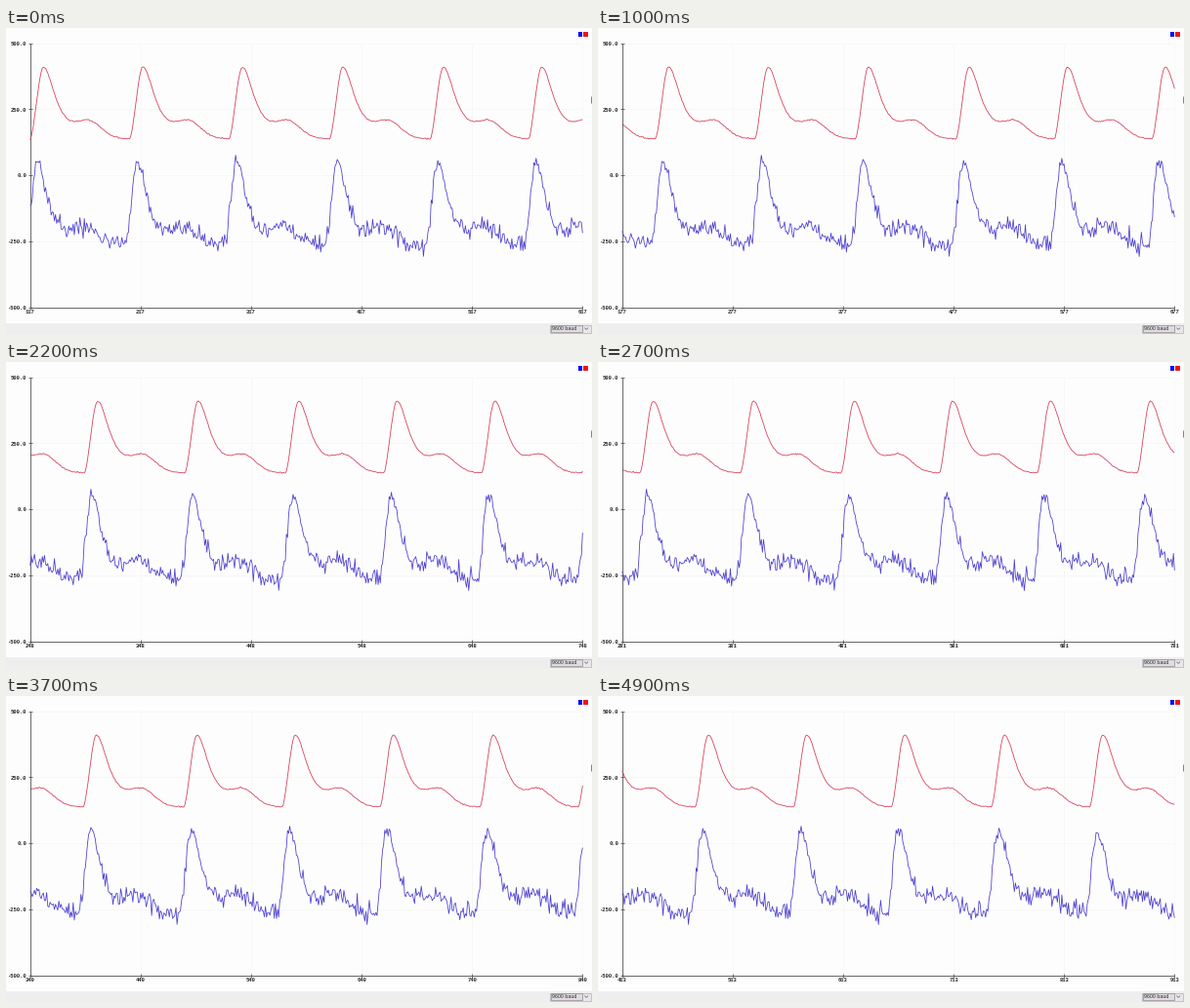
Recreate the animation shown at these times as a matplotlib script. Size 600x314 px, loop 5000 ms.

```python
import numpy as np
import matplotlib.pyplot as plt
from matplotlib.animation import FuncAnimation
from matplotlib.patches import Rectangle

W, H, DPI = 600, 314, 100
FRAMES, INTERVAL = 50, 100
LEFT, RIGHT, TOP, BOTTOM = 24.7, 590.3, 15.5, 286.5
SPAN = 500                       # samples across the plot
STEP = (RIGHT - LEFT) / SPAN     # pixels per sample
FIRST, LAST = 117, 913
PX = 72 / DPI                    # points per pixel

# Scroll: first visible sample at a few frames
SCROLL = ([0, 10, 22, 27, 37, 44, 49], [117, 177, 248, 281, 340, 382, 413])
BEATS = np.array([129, 219, 309, 400, 491, 580, 668.5, 759, 848, 940])


def smoothstep(u):
    u = np.clip(u, 0, 1)
    return u * u * (3 - 2 * u)


def pulse(d, height, decay, hump, rise):
    """Steep rise, long decay and a second small hump; d is pixels from the peak."""
    fall = height / (1 + (d / decay) ** 2) + hump * np.exp(-((d - 47.5) / 12) ** 2 / 2)
    return np.where(d < 0, height * smoothstep(1 + d / rise), fall)


def pulse_train(x, lag=0, **shape):
    return np.max([pulse((x - beat) * STEP + lag, **shape) for beat in BEATS], axis=0)


rng = np.random.default_rng(8)
samples = np.arange(FIRST, LAST + 1)
smooth = 116 - pulse_train(samples, height=76, decay=15, hump=14.5, rise=14.5)
smooth += rng.normal(0, .3, samples.size)

raw_height = pulse_train(samples, lag=6, height=88, decay=12, hump=17, rise=12.5)
raw = 225 - raw_height + rng.normal(0, 1, samples.size) * (5.5 - raw_height / 35)

fig = plt.figure(figsize=(W / DPI, H / DPI), dpi=DPI, facecolor="#fdfdfe")
ax = fig.add_axes([0, 0, 1, 1])
ax.set(xlim=(0, W), ylim=(H, 0))
ax.axis("off")


def line(xs, ys, color, width=1, **kw):
    return ax.plot(xs, ys, color=color, lw=width * PX, solid_capstyle="butt", **kw)[0]


def box(x, y, w, h, fill, edge="none"):
    ax.add_patch(Rectangle((x, y), w, h, fc=fill, ec=edge, lw=.7 * PX, zorder=3))


def label(x, y, text, ha="center", size=5.5, font="Liberation Mono", **kw):
    return ax.text(x, y, text, ha=ha, va="center_baseline", fontsize=size * PX,
                   family=font, color="#2a2a2a", zorder=4, **kw)


tick_x = np.linspace(LEFT, RIGHT, 6)
tick_y = np.linspace(TOP, BOTTOM, 5)
for x in tick_x[1:]:
    line([x, x], [TOP, BOTTOM], "#f7f7f8", zorder=0)
for y, value in zip(tick_y, np.linspace(500, -500, 5)):
    line([LEFT, RIGHT], [y, y], "#f7f7f8", zorder=0)
    line([22.5, 27], [y, y], "#555555", .8)
    label(21, y + .3, f"{value:.1f}", "right", weight="bold")
for x in tick_x:
    line([x, x], [284.5, 288.5], "#555555", .8)
line([LEFT, LEFT], [TOP, BOTTOM], "#444444", .8)
line([LEFT, RIGHT], [BOTTOM, BOTTOM], "#444444", .8)

box(585.5, 4.3, 4.6, 4.6, "#0a0af5")
box(591, 4.3, 4.6, 4.6, "#f01420")
line([599.4, 599.4], [70, 77], "#666670", .8)

# Status bar with the speed selector
box(0, 302.5, W, 12, "#eeeeee")
box(557, 304.5, 42, 8, "#e8e8e8", "#b4b4b4")
box(558, 305.3, 31.5, 6.2, "#dedce0", "#908890")
label(558.8, 308.4, "9600 baud", "left", 5.2, "Liberation Sans")
line([592.3, 594.2, 596.1], [307.5, 309.4, 307.5], "#777777", .8, zorder=4)

smooth_line = line([], [], "#d63c54", .8, zorder=2)
raw_line = line([], [], "#4a3ecc", .8, zorder=2)
x_labels = [label(x, 290.9, "", weight="bold") for x in tick_x]
plot_x = LEFT + STEP * np.arange(SPAN + 1)


def update(frame):
    start = int(round(np.interp(frame, *SCROLL)))
    view = slice(start - FIRST, start - FIRST + SPAN + 1)
    smooth_line.set_data(plot_x, smooth[view])
    raw_line.set_data(plot_x, raw[view])
    for k, text in enumerate(x_labels):
        text.set_text(str(start + 100 * k))
    return [smooth_line, raw_line, *x_labels]


anim = FuncAnimation(fig, update, frames=FRAMES, interval=INTERVAL,
                     repeat=True, repeat_delay=0, blit=False)
plt.show()
```
